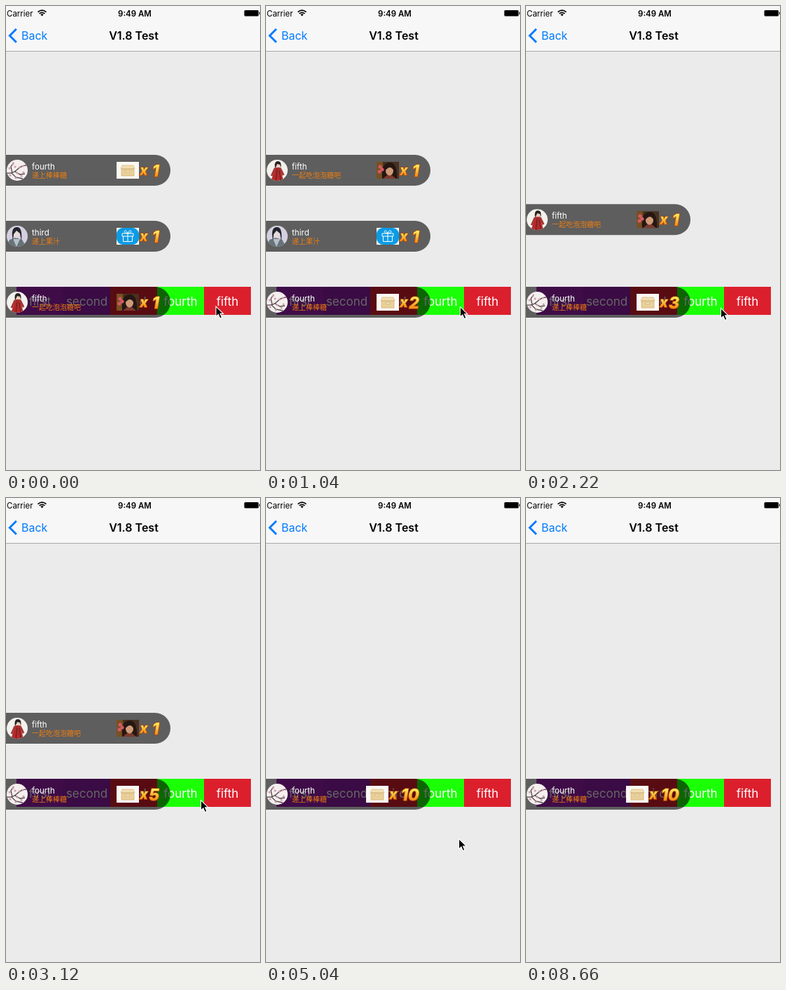
An HTML page for the animation above (8810 ms loop, 363 by 661 pixels).

```html
<!DOCTYPE html>
<html lang="zh-CN">
<head>
<meta charset="utf-8">
<title>V1.8 Test</title>
<style>
  html, body { margin: 0; width: 100%; height: 100%; overflow: hidden; background: #ebebeb; }
  svg { display: block; width: 363px; height: 661px; font-family: Inter, "Noto Sans CJK SC", "Noto Sans CJK", sans-serif; }
  .mid { text-anchor: middle; }
  .button { font-size: 17px; fill: #fff; text-anchor: middle; }
  .name { font-size: 11.6px; fill: #fff; }
  .note { font: 10px "Noto Sans CJK SC", "Noto Sans CJK", sans-serif; fill: #ef7d0e; }
  .count { font-weight: 800; font-style: italic; fill: url(#gold); stroke: #b9480a; stroke-width: 1.6; stroke-linejoin: round; paint-order: stroke; }
</style>
</head>
<body>
<svg viewBox="0 0 363 661">
  <defs>
    <linearGradient id="gold" x2="0" y2="1">
      <stop offset=".25" stop-color="#ffe95c"/>
      <stop offset=".8" stop-color="#f58a12"/>
    </linearGradient>
    <clipPath id="round"><circle r="15"/></clipPath>
    <clipPath id="tile"><path d="M0 0H32V24H0Z"/></clipPath>

    <g id="avatar-fourth">
      <path d="M-15-15H15V15H-15Z" fill="#f5efef"/>
      <path d="M-15 4Q-6 5 0-1T13-7M-8 4L-2 10 8 12M-3 2L4 6 11 5M-7 4L-9-5-5-11" fill="none" stroke="#54474a" stroke-width="1.3"/>
      <path d="M-11-3h.1M-6-9h.1M-3-5h.1M3-4h.1M8-6h.1M0 4h.1M6 8h.1M9 3h.1M-2 11h.1M-10 7h.1" stroke="#c9a0a6" stroke-width="3" stroke-linecap="round"/>
    </g>
    <g id="avatar-third">
      <path d="M-15-15H15V15H-15Z" fill="#d5d0e0"/>
      <path d="M-15 15L-11 5-2 2 7 5 13 15Z" fill="#65747a"/>
      <path d="M-6 4L-1 15 4 4Z" fill="#b9bfc8"/>
      <ellipse cx="-1" cy="-3" rx="4" ry="5.5" fill="#e6d9d8"/>
      <path d="M-6 6Q-10-12-1-13T6 7L4-4-1-8-5-3Z" fill="#20242c"/>
    </g>
    <g id="avatar-fifth">
      <path d="M-15-15H15V15H-15Z" fill="#f3f1ec"/>
      <path d="M-2-4L4-4 9 15H-9Z" fill="#b32a2a"/>
      <path d="M-3-3L-8 8M4-3L9 7" stroke="#a43535" stroke-width="3"/>
      <path d="M0-1L-2 15M3 0L5 15" stroke="#611b1e"/>
      <circle cx="1" cy="-7" r="3" fill="#e8cdbd"/>
      <path d="M-3-2Q-5-13 1-13T5-3L4-8 0-9Z" fill="#26201f"/>
    </g>

    <g id="gift-fourth">
      <path d="M0 0H32V24H0Z" fill="#fbf9f4"/>
      <path d="M7 9H25V20H7Z" fill="#e9cf98"/>
      <path d="M8 5H24L26 10H6Z" fill="#f2dfb2" stroke="#d4b67a" stroke-width=".7"/>
      <path d="M7 10H25V20H7Z" fill="none" stroke="#cfae70" stroke-width=".7"/>
      <path d="M13 12.5H19V14.5H13Z" fill="#fff3d2" stroke="#b99a61" stroke-width=".5"/>
    </g>
    <g id="gift-third">
      <path d="M0 0H32V24H0Z" fill="#fff"/>
      <rect width="32" height="24" rx="9" fill="#0c9be5"/>
      <path d="M8 8H24V12H8ZM9.500 12V19.500H22.500V12M16 8V19.500M16 8Q10 7 11.500 4.500T16 8Q18 2.500 20.500 4.500T16 8" fill="none" stroke="#fff"/>
    </g>
    <g id="gift-fifth">
      <path d="M0 0H32V24H0Z" fill="#49301e"/>
      <path d="M0 0H9V24H0Z" fill="#795021"/>
      <path d="M8 24Q6 2 18 1T29 24Z" fill="#251713"/>
      <path d="M9 24L15 19H22L28 24Z" fill="#7d3b2d"/>
      <ellipse cx="18.500" cy="13" rx="5.500" ry="6.500" fill="#cf9a78"/>
      <path d="M12 13Q12 5 19 5T25 13Q22 8 19 8T12 13Z" fill="#251713"/>
      <path d="M5 7h.1M8 11h.1M4 14h.1" stroke="#d55a66" stroke-width="5" stroke-linecap="round"/>
    </g>
  </defs>

  <path d="M0 0H363V661H0Z" fill="#ebebeb"/>
  <path d="M0 0H363V64H0Z" fill="#f7f7f7"/>
  <path d="M0 64.500H363" stroke="#a9a9a9"/>
  <text x="1" y="14.500" font-size="11.500">Carrier</text>
  <g fill="none" stroke="#000" stroke-width="1.700">
    <path d="M45.500 8.600Q51.500 3.800 57.500 8.600M47.600 10.900Q51.500 7.800 55.400 10.900"/>
    <path d="M49.300 12.100Q51.500 10.300 53.700 12.100L51.500 14.400Z" fill="#000" stroke="none"/>
  </g>
  <text class="mid" x="184" y="14.500" font-size="11.500" font-weight="600">9:49 AM</text>
  <rect x="340.500" y="6" width="20.500" height="8.500" rx="1.500"/>
  <path d="M362 8.500H363V12H362Z"/>
  <path d="M14.800 32.700L5.300 42.200 14.800 51.700" fill="none" stroke="#007aff" stroke-width="2.900"/>
  <text x="22" y="48" font-size="16" fill="#007aff">Back</text>
  <text class="mid" x="182.500" y="48" font-size="16" font-weight="600">V1.8 Test</text>

  <g id="buttons"></g>
  <g id="rows"></g>
  <path id="cursor" d="M0 0V14.500L3.400 11.400 5.900 17 8.500 15.900 6.100 10.400H10.600Z" stroke="#fff" stroke-width="1.100"/>
</svg>
<script>
const LOOP = 8810, STEP = 147.9;
const SORT = 300, HIDE = 520, POP = 240;
const $ = id => document.getElementById(id);

const buttons = [['first', '#9d1fb5'], ['second', '#911cab'], ['third', '#dc1f2d'], ['fourth', '#1bff06'], ['fifth', '#dc1f2d']];
$('buttons').innerHTML = buttons.map(([label, color], i) =>
  `<rect x="${15 + 67 * i}" y="400" width="67" height="40" fill="${color}"/>
   <text class="button" x="${48.5 + 67 * i}" y="426.500">${label}</text>`).join('');

// moves: [start time, target y]
const rows = [
  { id: 'third', note: '递上果汁', y: 306, moves: [], hide: 1495 },
  { id: 'fifth', note: '一起吃泡泡糖吧', y: 400, moves: [[690, 212], [2017, 306]], hide: 3840 },
  { id: 'fourth', note: '递上棒棒糖', y: 212, moves: [[690, 400]], hide: Infinity }
];
const clicks = [700, 1930, 2370, 2770, 3170, 3570, 3900, 4300, 4680];
const cursorPath = [
  [0, 300, 428], [440, 277.500, 428.500], [1040, 277.500, 428.500], [1150, 278.500, 430.500],
  [4750, 278.500, 430.500], [5020, 275.500, 483.500], [5325, 278, 557], [5500, 278, 557], [6350, 338, 664]
];

$('rows').innerHTML = rows.map(({ id, note }) => `
  <g id="${id}">
    <path d="M0 0H213A22 22 0 0 1 213 44H0Z" fill-opacity=".6"/>
    <g transform="translate(16 22)" clip-path="url(#round)"><use href="#avatar-${id}"/></g>
    <text class="name" x="37" y="20.500">${id}</text>
    <text class="note" x="37" y="32.800">${note}</text>
    <g class="gift"><g clip-path="url(#tile)"><use href="#gift-${id}"/></g></g>
    <g class="count">
      <text class="times mid" y="29" font-size="19">x</text>
      <text class="digits" x="219" y="30.500" font-size="23" text-anchor="end"></text>
    </g>
  </g>`).join('');

const progress = (t, start, duration) => Math.min(1, Math.max(0, (t - start) / duration));
const ease = p => p * p * (3 - 2 * p);

function drawRow(row, t) {
  const group = $(row.id), part = name => group.querySelector('.' + name);
  const x = -235 * ease(progress(t, row.hide, HIDE));
  const y = row.moves.reduce((from, [start, to]) => from + (to - from) * ease(progress(t, start, SORT)), row.y);
  group.setAttribute('transform', `translate(${x} ${y})`);

  const past = row.id === 'fourth' ? clicks.filter(c => c <= t) : [];
  const count = 1 + past.length;
  const shift = count > 9 ? 15 : 0;
  const scale = past.length ? 1 + .42 * Math.sin(Math.PI * progress(t, past.at(-1), POP)) : 1;
  part('digits').textContent = count;
  part('times').setAttribute('x', 197 - shift);
  part('gift').setAttribute('transform', `translate(${158 - shift} 10)`);
  part('count').setAttribute('transform', `translate(220 22) scale(${scale}) translate(-220 -22)`);
}

function drawCursor(t) {
  let [, x, y] = cursorPath[0];
  for (let i = 1; i < cursorPath.length; i++) {
    const [start] = cursorPath[i - 1], [end, toX, toY] = cursorPath[i];
    const p = progress(t, start, end - start);
    x += (toX - x) * p;
    y += (toY - y) * p;
  }
  $('cursor').setAttribute('transform', `translate(${x} ${y})`);
}

function frame() {
  const t = Math.floor(performance.now() % LOOP / STEP) * STEP;
  rows.forEach(row => drawRow(row, t));
  drawCursor(t);
  requestAnimationFrame(frame);
}
frame();
</script>
</body>
</html>
```
